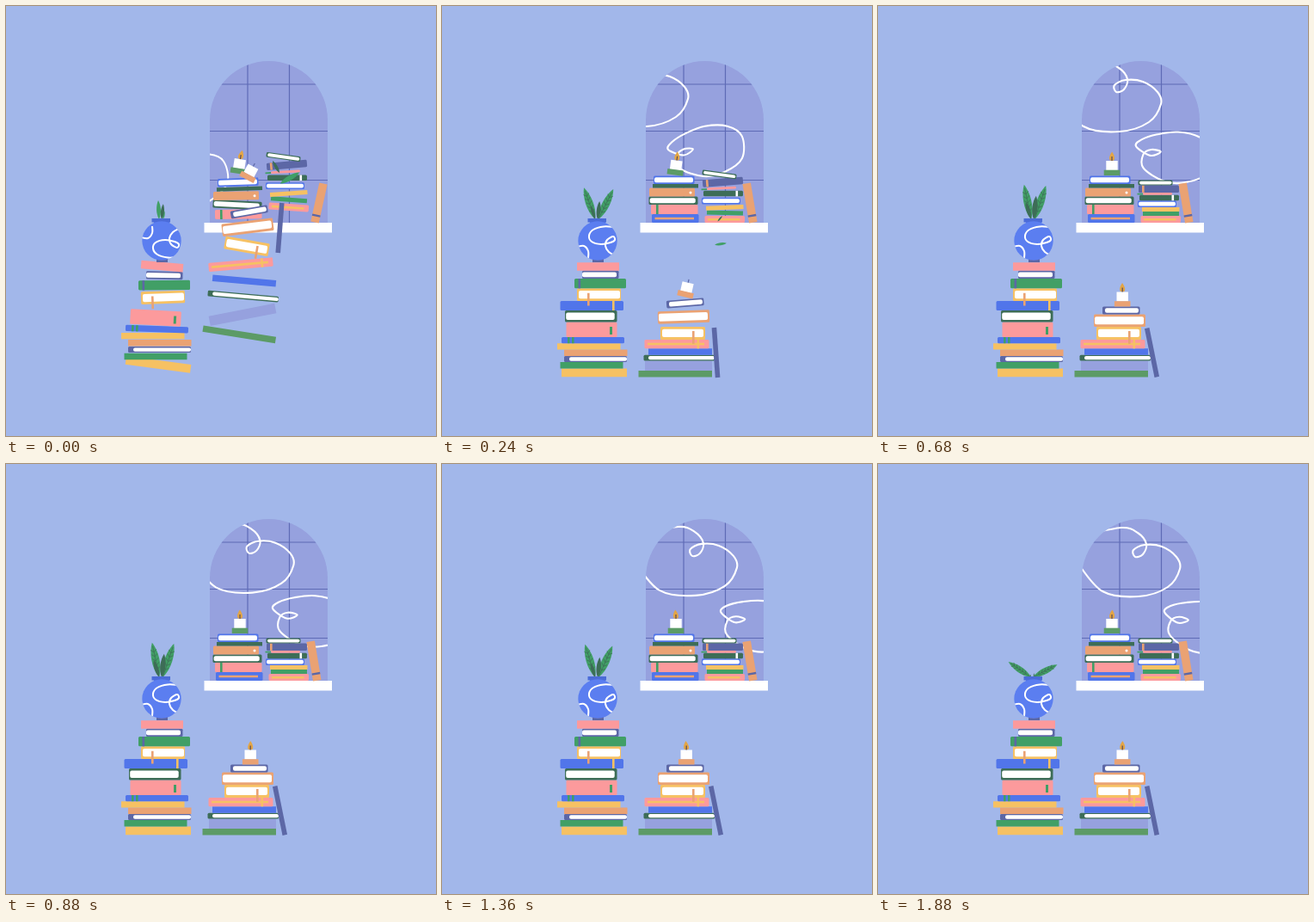
These frames come from a looping animation (500x500 px, 1.96 s). An HTML page with a canvas:

```html
<!DOCTYPE html>
<html lang="en">
<head>
<meta charset="utf-8">
<title>Book stacks</title>
<style>
html, body { margin: 0; width: 100%; height: 100%; overflow: hidden; background: #a2b7ea; }
canvas { display: block; width: 500px; height: 500px; }
</style>
</head>
<body>
<canvas id="stage" width="500" height="500"></canvas>
<script>
const ctx = document.getElementById('stage').getContext('2d');
const LOOP = 1960, STEP = 40, LAST = 1880;
const SKY = '#a2b7ea', LAV = '#96a1de', GRID = '#5e6bb6', WHITE = '#ffffff', BLUE = '#5175ea',
  INDIGO = '#5c67a6', PINK = '#fc9a9c', YELLOW = '#f6c163', ORANGE = '#eaa273',
  GREEN = '#419f66', DARK = '#3d6d57', GRASS = '#5c9b66', FLAME = '#e3a545';

const rad = d => d * Math.PI / 180;
const clamp = v => Math.max(0, Math.min(1, v));

// Monotone cubic through keys [time, a, b, ...]; returns [a, b, ...]
function track(keys, t) {
  const i = Math.max(0, keys.findLastIndex((k, n) => k[0] <= t && n < keys.length - 1));
  const [k, next] = [keys[i], keys[i + 1]];
  const d = next[0] - k[0], u = (t - k[0]) / d, v = 1 - u;
  return k.slice(1).map((value, n) => {
    const slope = j => (keys[j + 1][n + 1] - keys[j][n + 1]) / (keys[j + 1][0] - keys[j][0]);
    const tangent = j => {
      const a = slope(Math.max(0, j - 1)), b = slope(Math.min(keys.length - 2, j));
      return a * b > 0 ? 2 * a * b / (a + b) : 0;
    };
    return value * v * v * (1 + 2 * u) + next[n + 1] * u * u * (3 - 2 * u)
      + d * u * v * (v * tangent(i) - u * tangent(i + 1));
  });
}

function box(x, y, w, h, color, r = 0) {
  ctx.fillStyle = color;
  ctx.beginPath();
  ctx.roundRect(x, y, w, h, r);
  ctx.fill();
}

function spline(pts, closed) {
  const n = pts.length;
  const at = i => closed ? pts[(i + n) % n] : pts[Math.max(0, Math.min(n - 1, i))];
  ctx.beginPath();
  ctx.moveTo(...pts[0]);
  for (let i = 0; i < (closed ? n : n - 1); i++) {
    const [a, b, c, d] = [at(i - 1), at(i), at(i + 1), at(i + 2)];
    ctx.bezierCurveTo(b[0] + (c[0] - a[0]) / 6, b[1] + (c[1] - a[1]) / 6,
      c[0] - (d[0] - b[0]) / 6, c[1] - (d[1] - b[1]) / 6, c[0], c[1]);
  }
  ctx.stroke();
}

// Offset that shrinks to zero at `land`; the tilt stays until just before touchdown
function fall(t, dx, dy, tilt, land, settle = land) {
  const left = 1 - clamp(t / land) ** 1.2;
  return [dx * left, dy * left, tilt * (1 - clamp(t / settle) ** 9.6)];
}

function placed(cx, cy, [dx, dy, tilt], draw, sy = 1) {
  ctx.save();
  ctx.translate(cx + dx, cy + dy);
  ctx.rotate(rad(tilt));
  ctx.scale(1, sy);
  ctx.translate(-cx, -cy);
  draw();
  ctx.restore();
}

// Book decorations, drawn inside the box x, y, w, h
const pages = (a = 1.2, b = 2.8) => (x, y, w, h) => box(x + a, y + h * 0.19, w - a - b, h * 0.62, WHITE, 2);
const mark = (at, color, drop = 0) => (x, y, w, h) => box(x + at, y + drop, 2.6, h, color);
const band = color => (x, y, w, h) => box(x + 3.5, y + h * 0.37, w - 9, 2.6, color);

// Rows from the bottom up: x, width, height, color, tilt, decorations
function stack(t, floor, rows, drop, land, hidden = []) {
  rows.reduce((base, [x, w, h, color, tilt, ...extras], i) => {
    const y = base - h, grow = hidden.includes(i) ? clamp(t / 200) : 1;
    if (grow > 0) placed(x + w / 2, y + h / 2, fall(t, 0, drop(i), tilt, land(i)), () => {
      box(x, y, w, h, color, extras.length ? 1.5 : 0);
      extras.forEach(draw => draw(x, y, w, h));
    }, grow);
    return y;
  }, floor);
}

const besideVase = [
  [139, 76, 9.8, YELLOW, 7.5],
  [137.5, 73, 7.5, GREEN, 0],
  [142, 73, 7, INDIGO, 0, pages(6, 0)],
  [142, 73.5, 7.4, ORANGE, 0],
  [134, 73.5, 7.4, YELLOW, 0],
  [139, 73, 7.2, BLUE, 2, mark(7, GREEN), mark(12, GREEN)],
  [144.5, 59, 17.5, PINK, 3, (x, y) => box(x + 50.5, y + 5.5, 3, 9, GREEN)],
  [143, 60.5, 13.5, DARK, 0, pages()],
  [137.5, 73.5, 11, BLUE, 0, mark(60.5, YELLOW)],
  [157, 51, 14.7, YELLOW, -2, pages(2, 1), mark(12, ORANGE, 5.5)],
  [154, 60, 11.3, GREEN, -0.5, mark(4.5, INDIGO)],
  [163, 42.5, 9.2, INDIGO, 1, pages(0, 2.5)],
  [157, 49, 9.5, PINK, 5]
];
const underCandle = [
  [244, 54.5, 10, BLUE, 0, band(ORANGE)],
  [243, 54.5, 11, PINK, -1, mark(6, GREEN)],
  [240.5, 57, 9.5, DARK, 3, pages()],
  [241, 53, 10, ORANGE, -1, (x, y) => box(x + 46.5, y + 4, 3, 3, WHITE, 1.5)],
  [245, 53, 4.5, DARK, -2],
  [246, 47.5, 9.5, BLUE, -2, pages(1, 1.5)]
];
const byWindow = [
  [305.5, 46.5, 8, PINK, 4, band(YELLOW)],
  [308, 42, 5, GREEN, 4],
  [307, 43.5, 5, YELLOW, -4],
  [302, 45, 7.8, BLUE, 0, pages(1, 1)],
  [304, 46, 6.5, DARK, 0, mark(37.5, WHITE)],
  [308, 34, 2.8, PINK, -3, (x, y) => box(x - 6.5, y + 0.8, 6.5, 1.8, GREEN)],
  [303, 47, 8.4, INDIGO, -5, mark(4, ORANGE)],
  [302.5, 40, 5.9, DARK, 8, pages(1.5, 1)]
];
const onFloor = [
  [228.5, 85.5, 7.4, GRASS, 9],
  [236, 78, 11.5, LAV, -11],
  [234.5, 82.5, 6.8, DARK, 5, pages(5.5, 0)],
  [240, 74, 7.5, BLUE, 5],
  [235.5, 75, 10.4, PINK, -5, band(YELLOW), mark(61, YELLOW)],
  [254, 52, 15, YELLOW, 10, pages(2, 2), mark(37, ORANGE, 5)],
  [251, 60, 14.5, ORANGE, -7, pages(1, 2)],
  [261, 43.5, 8.8, INDIGO, -10, pages(3, 1.5)]
];

const upper = [[-112, -38], [-68, -47], [-49, -41], [-39, -28], [-43, -16], [-52, -13], [-54, -21],
  [-41, -27], [-21, -25], [-4, -13], [0, 1], [-14, 22], [-48, 33], [-90, 27], [-119, -6]];
const lower = [[0, 0], [6, -8], [24, -15], [48, -19], [74, -14], [89, 1], [84, 27], [60, 39],
  [35, 39], [10, 25], [9, 9], [18, 3], [29, 5], [17, 10]];
// time, x, y
const upperPath = [[0, 195, 128], [240, 286, 107], [400, 304, 107], [680, 329, 113], [1080, 338, 119], [1880, 351, 121]];
// time, x, y, turn
const lowerPath = [[0, 174, 211, -22], [240, 263, 167, -11], [400, 284, 160, 0], [680, 300, 163, 3], [1080, 318, 172, 6], [1880, 333, 172, 9]];

function pane(t) {
  ctx.save();
  ctx.beginPath();
  ctx.moveTo(237, 253);
  ctx.arc(305.5, 132.5, 68.5, Math.PI, 0);
  ctx.lineTo(374, 253);
  ctx.clip();
  box(230, 60, 150, 200, LAV);
  for (const x of [281, 329.5]) box(x - 0.6, 60, 1.2, 200, GRID);
  for (const y of [91, 145.5, 202.5]) box(230, y - 0.6, 150, 1.2, GRID);
  ctx.strokeStyle = WHITE;
  ctx.lineWidth = 2.1;
  const [ux, uy] = track(upperPath, t);
  placed(0, 0, [ux, uy, 0], () => spline(upper));
  const [lx, ly, turn] = track(lowerPath, t);
  placed(0, 0, [lx, ly, turn], () => {
    const size = 0.95 + 0.05 * clamp(t / 400);
    ctx.scale(size, size);
    spline(lower, true);
  });
  ctx.restore();
  box(230.5, 252, 148.5, 11.6, WHITE);
}

function candle(t, x, y, color, shift, lit) {
  placed(x, y - 8, shift, () => {
    const top = y - 17, sway = Math.sin(t / LOOP * Math.PI * 10 + x) * 0.8;
    box(x - 0.6, top - 4, 1.2, 4.5, INDIGO);
    placed(x, top, [0, 0, 0], () => {
      ctx.fillStyle = FLAME;
      ctx.beginPath();
      ctx.moveTo(x + sway, top - 10.5);
      ctx.bezierCurveTo(x + 5, top - 3, x + 3, top, x, top);
      ctx.bezierCurveTo(x - 3, top, x - 5, top - 3, x + sway, top - 10.5);
      ctx.fill();
      box(x - 0.6, top - 5, 1.2, 5.5, '#5a4a55');
    }, lit);
    box(x - 6.7, top, 13.4, 11, WHITE);
    box(x - 9.3, y - 6.3, 18.6, 6.3, color);
  });
}

function leaf(x, y, len, angle, color, veins) {
  const w = len * 0.165;
  placed(0, 0, [x, y, angle], () => {
    ctx.fillStyle = color;
    ctx.beginPath();
    ctx.moveTo(0, 0);
    ctx.bezierCurveTo(-w, -len * 0.3, -w * 0.8, -len * 0.75, 0, -len);
    ctx.bezierCurveTo(w * 0.8, -len * 0.75, w, -len * 0.3, 0, 0);
    ctx.fill();
    if (!veins) return;
    ctx.strokeStyle = DARK;
    ctx.lineWidth = 0.7;
    ctx.beginPath();
    ctx.moveTo(0, 0);
    ctx.lineTo(0, -len * 0.9);
    for (let i = 1; i < 6; i++) {
      const v = -len * (0.1 + i * 0.125);
      ctx.moveTo(-w / 2, v - 3);
      ctx.lineTo(0, v);
      ctx.lineTo(w / 2, v - 3);
    }
    ctx.stroke();
  });
}

// time, leaf length, spread from upright
const growth = [[0, 22, 6], [240, 39, 23], [400, 41, 15], [1160, 41, 15], [1360, 40, 20.5], [1660, 32, 57], [1880, 32, 59]];

function plant(t) {
  const [len, spread] = track(growth, t);
  const heart = len * Math.max(0.15, 0.9 - spread * 0.0155);
  leaf(178, 248, len, 3.5 - spread, GREEN, t > 100);
  leaf(183 - spread * 0.05, 248, len * clamp(0.45 + t / 400), spread + 3.5, GREEN, t > 100);
  leaf(178, 248, heart * 0.76 * clamp(t / 200), -17, DARK);
  leaf(181, 248, heart, 6, DARK);
}

function vase(t) {
  plant(t);
  box(175, 292, 13, 6, INDIGO);
  box(172, 249, 18, 6, BLUE);
  box(169.5, 247, 21.5, 4.5, '#4b6bd8');
  ctx.save();
  ctx.beginPath();
  ctx.arc(181, 273, 22.7, 0, 7);
  ctx.clip();
  box(155, 248, 52, 50, '#5b7ef0');
  // The pattern flips upright as the vase settles
  const flip = -Math.cos(Math.PI * clamp(t / 220));
  ctx.strokeStyle = WHITE;
  ctx.lineWidth = 2;
  placed(0, 0, [181, 274.5 - 1.5 * flip, 0], () => {
    spline([[19, -16], [7, -16.5], [-5, -13], [-10, -6], [-7, 1], [4, 4], [15, 2], [20, -1], [18, -5],
      [11, -1], [9, 6], [13, 13], [20, 17]]);
    spline([[-24, 7], [-16, 6], [-11, 12], [-11, 20]]);
  }, flip);
  ctx.restore();
}

function leaning(x, y, w, h, color, tilt, shift, trim) {
  placed(x, y, shift, () => placed(x, y, [0, 0, tilt], () => {
    box(x - w / 2, y - h / 2, w, h, color);
    if (trim) box(x - w / 2, y + h * 0.3, w, 2.4, trim);
  }));
}

// A leaf that drifts down and shrinks away
function looseLeaf(t, x, y, dx, dy, len, angle, turn, color) {
  const left = 1 - clamp(t / 520), u = 1 - left * left;
  const a = angle + turn * u, size = len * left;
  leaf(x + dx * u - Math.sin(rad(a)) * size / 2, y + dy * u + Math.cos(rad(a)) * size / 2, size, a, color);
}

function draw(t) {
  box(0, 0, 500, 500, SKY);
  pane(t);
  stack(t, 252, underCandle, i => 6.4 - i * 0.75, () => 200, [0]);
  candle(t, 272, 197, GRASS, fall(t, -1, -2, 9, 290), 1);
  stack(t, 252, byWindow, i => -14 - i * 2.3, i => 240 + i * 13);
  leaning(358, 229, 9.6, 46, ORANGE, -9.5, fall(t, 6, 0, 22, 240), INDIGO);
  stack(t, 431.3, besideVase, i => i < 7 ? -9.5 - i * 0.7 : 14 - i * 1.2, () => 210, [7, 8]);
  vase(t);
  stack(t, 431.5, onFloor, i => -46 - 14 * i + 0.6 * i * i, i => 200 + i * 8);
  candle(t, 284.2, 349.5, ORANGE, fall(t, -1, -147, 28, 256), clamp((t - 440) / 160));
  leaning(318.5, 403, 5.6, 58, INDIGO, -11.5, fall(t, 0, -145, 16, 235, 256));
  looseLeaf(t, 314, 187, 13, 85, 16, -30, 100, DARK);
  looseLeaf(t, 330, 200, -8.5, 108, 26, 60, 30, GREEN);
}

const start = performance.now();
function tick() {
  const t = (performance.now() - start) % LOOP;
  draw(Math.min(LAST, Math.floor(t / STEP) * STEP));
  requestAnimationFrame(tick);
}
tick();
</script>
</body>
</html>
```
